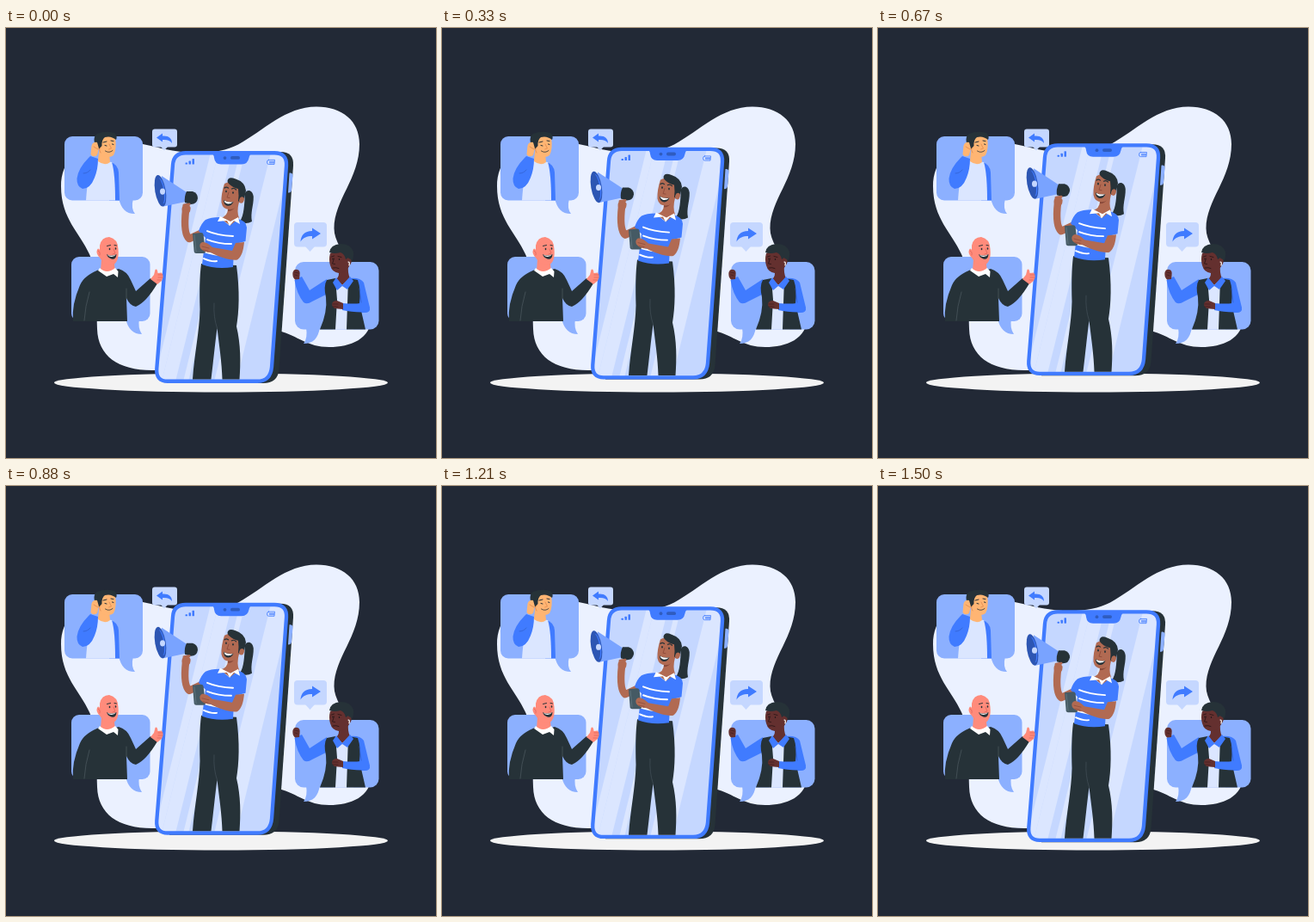
Animation of 500 by 500 pixels, one loop 1540 ms. Source, as an HTML page with a canvas:

```html
<!DOCTYPE html>
<html lang="en">
<head>
<meta charset="utf-8">
<title>Announcement</title>
<style>
html, body { margin: 0; width: 100%; height: 100%; overflow: hidden; background: #222936; }
canvas { display: block; width: 500px; height: 500px; }
</style>
</head>
<body>
<canvas id="stage" width="500" height="500"></canvas>
<script>
const ctx = document.getElementById('stage').getContext('2d');

const NIGHT = '#222936', INK = '#263238', BLUE = '#407bff', NAVY = '#2d56b3', SKY = '#79a3ff',
  MID = '#8cb0ff', SOFT = '#c5d7ff', PALE = '#dbe6ff', MIST = '#ebf1ff', WHITE = '#ffffff',
  TAN = '#ffb573', PINK = '#ff8b7b', BROWN = '#b16a52', DEEP = '#64302f';

const LOOP = 1540, STEP = 1000 / 24, LAST_STEP = 36;

const paths = new Map();
function path(d) {
  if (!paths.has(d)) paths.set(d, new Path2D(d));
  return paths.get(d);
}
function fill(color, d) {
  ctx.fillStyle = color;
  ctx.fill(path(d));
}
function line(color, width, d) {
  ctx.strokeStyle = color;
  ctx.lineWidth = width;
  ctx.stroke(path(d));
}
function oval(color, x, y, rx, ry = rx, turn = 0) {
  ctx.fillStyle = color;
  ctx.beginPath();
  ctx.ellipse(x, y, rx, ry, turn, 0, Math.PI * 2);
  ctx.fill();
}
function box(color, x, y, w, h, r) {
  ctx.fillStyle = color;
  ctx.beginPath();
  ctx.roundRect(x, y, w, h, r);
  ctx.fill();
}
function clipped(d, draw) {
  ctx.save();
  ctx.clip(path(d));
  draw();
  ctx.restore();
}

function backdrop() {
  ctx.fillStyle = NIGHT;
  ctx.fillRect(0, 0, 500, 500);
  fill(MIST, 'M159 135C178 139 195 144 215 145C238 146 255 143 270 135.500C300 119 325 91.500 361 91.500C391 91.500 411 108 411 135C411 175 381.500 200 381.500 233C381.500 262 425 290 425 335C425 362 400 371 376 371C350 371 340 358 317 352C260 350 240 398 170 398C130 398 107 381 106 350C105 315 109 290 97 263C86 238 64 222 64 184C64 150 90 125 159 135Z');
  oval('#f3f3f3', 250, 412.5, 194, 11);
}

function replyBubbles() {
  box(SOFT, 170, 117.5, 29, 21, 3);
  fill(SOFT, 'M180 138L184 142.500L188 138Z');
  fill(BLUE, 'M175 127.500L182 122.500V125.500C189 125 193 128 193 134C191 130.500 187 129.500 182 130V132.500Z');
  box(SOFT, 335, 226, 38, 28.5, 4);
  fill(SOFT, 'M348 254L353.500 260L359 254Z');
  fill(BLUE, 'M366 239L356 232.500V236C347 236 343 241 342.500 248.500C345.500 243.500 350 242 356 242V245.500Z');
}

function phone() {
  fill(INK, 'M210 144H319Q335 144 334 160L317.500 397Q316 413 299 413H190Z');
  fill(MID, 'M329.500 168.500Q333.700 168 333.500 172L332 188Q331.700 192 328 191.500Z');
  const shell = 'M209 145.200H312Q327 145.200 326 160L309 394Q307.500 410.700 292 410.700H188Q174.200 410.700 175.300 396L194 159Q195 145.200 209 145.200Z';
  fill(SOFT, shell);
  clipped(shell, () => {
    fill(PALE, 'M247 145H263L197 411H181Z');
    fill(PALE, 'M238 145H247L181 411H172Z');
    fill(PALE, 'M272 145H278L212 411H206Z');
    fill(PALE, 'M308 145H327L326 172L268 411H242Z');
  });
  line(BLUE, 4.3, shell);

  fill(BLUE, 'M238 145H287Q283 147 282.500 151Q281 158.500 274 158.500H250Q243 158.500 242 151Q242 147 238 145Z');
  oval('#2f5cbf', 254.5, 151, 1.9);
  box('#2f5cbf', 261, 149, 11, 3.8, 1.9);
  [2, 4, 6.5].forEach((h, i) => box(BLUE, 208.5 + i * 4, 158.5 - h, 2.5, h, 0.6));
  line(BLUE, 0.8, 'M305.500 153.300H312.500L312 158.500H305.500Q303.500 158.500 303.500 156Q303.500 153.300 305.500 153.300Z');
  line(BLUE, 1.3, 'M307 155V157M309 155V157M311 155V157');
}

function speaker() {
  // Ponytail and neck
  fill(INK, 'M278 192C280 187 287 188 287.800 196C288 207 284 214 286 225Q279 229 272 225C277 217 277 206 278 192Z');
  fill(BROWN, 'M258 204L271 202Q268 214 271 221L261 230L249 221Q258 219 258 210Z');
  fill('#88493a', 'M258 209L267 207Q264 213 258 213Z');

  // Trousers
  fill(INK, 'M227 274L268 276C272 306 271 330 268 347C273 368 273 389 271.500 408.500H251.500C251 389 248 370 245.500 349C243 367 241 389 238.500 408.500H217C219 380 225 352 225.500 327C225 306 225 290 227 274Z');
  line('#44515a', 0.7, 'M242 320Q241 336 245.500 349');

  // Raised arm
  line(BROWN, 8.5, 'M230 237L213 245Q206 239 209 212');
  oval(BROWN, 209.5, 210.5, 5, 6);

  const shirt = 'M232 223Q238 220 248 220L260 230L270 222Q279 224 280 232L278.500 248L267 251Q264 265 264 278Q244 281 228 275L232 244L224 236Q227 227 232 223Z';
  fill(BLUE, shirt);
  clipped(shirt, () => {
    line(WHITE, 1.9, 'M234 236Q246 241 264 242M234 246Q247 251 262 251M230 260Q245 265 262 264M230 268Q239 272 245 271');
  });
  fill(WHITE, 'M249 219L246 225L257 224L260 230L265 224L272 228L270 220L261 225Z');

  // Tablet and folded arm
  fill('#455a64', 'M217 239L227 238Q229 238 229.500 240L232 260Q232 262 230 262H221Q219 262 218.700 260Z');
  line('#657982', 0.8, 'M219 241L221 260');
  fill(BROWN, 'M267 250L277 249C276 259 274 266 269 269.500C262 271 247 266 238 261Q230 261 226 256Q224 251 228 249Q233 248 240 255L263 259Z');
  line('#8f4d3e', 0.8, 'M228 254L236 256M229 258L235 259');

  // Head
  fill(BROWN, 'M254 181Q262 176 274 183L276 195Q275 201 271 202Q268 211 260 211Q252 211 250.500 203Q250 193 254 181Z');
  fill(INK, 'M259 181Q256 178 259 175Q261 173 267 175.500Q278 179 279 189L277 199L274 197Q272 199 272 203L270 201Q271 195 270 187Q264 186 259 181Z');
  oval(BROWN, 274, 200, 2.8, 3.8, 0.3);
  oval(INK, 256, 190, 0.9, 1.3);
  oval(INK, 264, 191.5, 0.9, 1.3);
  line(INK, 1.2, 'M254 186Q256 184 258.500 186M262.500 187Q265 185.500 267.500 188');
  line('#8a4636', 0.8, 'M259 191L257 197L260 197.500');
  fill(INK, 'M253 200Q258 203 264.500 202Q262 208 256.500 206.500Q253 205 253 200Z');
  fill(WHITE, 'M253.500 200.500Q258 203 264 202.200Q261 205 257 204.300Q254 203.400 253.500 200.500Z');

  // Megaphone
  fill(SKY, 'M181 172L210 191L209 202L183 207.500Z');
  oval(NAVY, 179.5, 189.3, 6.2, 18.5, -0.17);
  oval(BLUE, 180.3, 189.3, 4.4, 15, -0.17);
  oval(NAVY, 179, 189.3, 4.4, 15.5, -0.17);
  oval(SOFT, 182, 190, 3, 3.6);
  fill(INK, 'M210 190L217 190Q223 192 223 198Q222 205 215 205L208 203Q207 196 210 190Z');
  line(BROWN, 3, 'M207 206L213 205M207 210L213 209');
}

function listener() {
  box(MID, 68, 126, 91, 74.5, 9);
  fill(MID, 'M131 198C134 210 139 216 150 216Q145 210 148 198Z');
  fill(BLUE, 'M121 156Q130 158 131 168L132 200.500H120Z');
  fill(PALE, 'M106 154L123 156Q127 169 127 200.500H93Q94 182 98 166Z');
  fill(TAN, 'M108 143L120 146L121 156Q115 161 107 155Z');
  fill(BLUE, 'M98 149L107 152Q107 164 103 174Q98 187 89 187Q82 184 82.500 175Q84 163 96 151Z');
  line('#315fcb', 0.7, 'M90 169Q95 169 98 165');
  fill(TAN, 'M107 127Q119 122 127 127Q129 141 125 148Q120 152 111 148Q106 140 107 127Z');
  fill(INK, 'M103 134Q101 126 106 123Q116 119 126 122Q130 125 128 130Q122 125 115 127Q111 130 111.500 137L108 141Q104 139 103 134Z');
  fill(TAN, 'M99.500 137Q101 132 106 133L108 140L106 148Q101 151 98.500 147Z');
  line('#df8b50', 0.8, 'M102 138L107 141M120 135L122.500 140L119.500 141M110 139Q107 140 110 145');
  line(INK, 1, 'M113 133L117 132M122 131L125 131.500M115 136.500L117 137M123.500 135L125 135.500');
  line(INK, 0.8, 'M115.500 143Q120 146 124 142.500');
}

function fan() {
  box(MID, 76, 266, 91.5, 75, 9);
  fill(MID, 'M139 338C142 350 148 356 158 356Q153 349 155 338Z');
  fill(INK, 'M111 280Q120 284 131 280Q141 283 145 293L151 306L168 291L176 297Q163 319 151 324Q144 323 140 314L141 341H78Q76 322 86 299Q91 287 111 280Z');
  line('#4a565c', 0.8, 'M97 307Q92 324 91 340M140 303V315');
  fill(PINK, 'M111 269L126 274L127 284Q119 289 110 282Z');
  fill(WHITE, 'M109 279Q117 287 127 279L130.500 283L130 290L125 286L117 289L107 282Z');
  fill(PINK, 'M109 253Q111 243 120 243Q130 245 130.500 257Q132 273 123 276Q113 275 109 267Q104 262 106 258Q107 255 109 258Z');
  line('#d95f55', 0.7, 'M107 259Q110 260 109 264M125 257L127 262L124 263');
  oval(INK, 120.5, 257, 0.8, 1.2);
  oval(INK, 127.5, 256.5, 0.8, 1.2);
  line(INK, 1, 'M117.500 253.500L121.500 252.500M126 252.500L128.500 253');
  fill(INK, 'M117 263Q122 266 128.500 263Q128 270 122.500 268.500Q118 267 117 263Z');
  fill(WHITE, 'M117.500 263.500Q122 266 128 263.500Q125 267 120 265.500Z');
  fill(PINK, 'M168 292L172 287L173.500 281Q176 279 176.500 285L181 284.500Q184 288 181 294L176 298Z');
  line('#d95f55', 0.7, 'M177 287L182 287M177 290L182 290M176 293L180 293');
}

function supporter() {
  box(MID, 336, 272, 97.5, 78.5, 10);
  fill(MID, 'M365 348C363 361 357 367 346 367Q351 361 349 348Z');
  fill(BLUE, 'M373 292L353 305L344 289L335.500 293Q338 309 346 319Q350 322 356 318L372 310Z');
  fill(DEEP, 'M333.500 284Q335 279.500 339 281Q342.500 282 341.500 288L341 292L336 292.500Q332.500 289 333.500 284Z');
  line('#3e1c1b', 0.7, 'M336 284L340 285M336 287L339 288');
  fill(BLUE, 'M400 291Q412 290 416 296L423 325Q424 331 417 331H390V321L410 320Z');
  fill(PALE, 'M382 291L399 290L404 350.500H380Z');
  fill(INK, 'M383 291L373 293Q369 300 372 313Q374 330 365 350.500H383L385 316Z');
  fill(INK, 'M398 291L409 293Q413 304 411 320L418 350.500H396Z');
  fill(BLUE, 'M391 320Q405 321 412 320L418 314L423 326Q422 331 414 330.500Q401 330 391 328Z');
  line('#315fcb', 0.7, 'M411 303L413 319');
  fill(DEEP, 'M387 280L398 274Q397 285 400 291L391 299L384 292Q388 289 387 280Z');
  fill(BLUE, 'M384 290L391 299L400 289L404 294L397 304L391 300L385 305L380 296Z');
  fill(DEEP, 'M377 262Q385 256 399 263L401 273Q397 284 387 285Q379 284 377 276Q375 269 377 262Z');
  fill(INK, 'M376 261Q377 252 389 251Q401 251 404 260Q405 267 401 273L398 267L395 269Q394 263 389 261Q382 263 376 261Z');
  oval(DEEP, 398.5, 272, 3, 3.8, 0.2);
  line(WHITE, 1.2, 'M398 272Q400 272 399 276');
  line('#2e1718', 0.9, 'M378.500 266L381.500 265M386 265.500L390 266.500M381.500 268L379.500 274L382.500 274.500M380 279Q384 278 387 279.500');
  oval('#20191b', 380, 268.5, 0.7, 1.1);
  oval('#20191b', 387.5, 269, 0.7, 1.1);
  fill(DEEP, 'M392 320L385 317Q379 317 379 322Q380 326 386 326.500L392 327Z');
  line('#3e1c1b', 0.7, 'M380 321L386 321M380 324L386 324');
}

function bob(time) {
  const step = Math.min(LAST_STEP, Math.floor((time % LOOP + 4) / STEP));
  return Math.abs(step - 17) * 0.555 - 9.4;
}

function render(time) {
  backdrop();
  replyBubbles();
  ctx.save();
  ctx.translate(0, bob(time));
  phone();
  speaker();
  ctx.restore();
  listener();
  fan();
  supporter();
}

ctx.lineCap = ctx.lineJoin = 'round';
const start = performance.now();
function tick() {
  render(performance.now() - start);
  requestAnimationFrame(tick);
}
tick();
</script>
</body>
</html>
```
